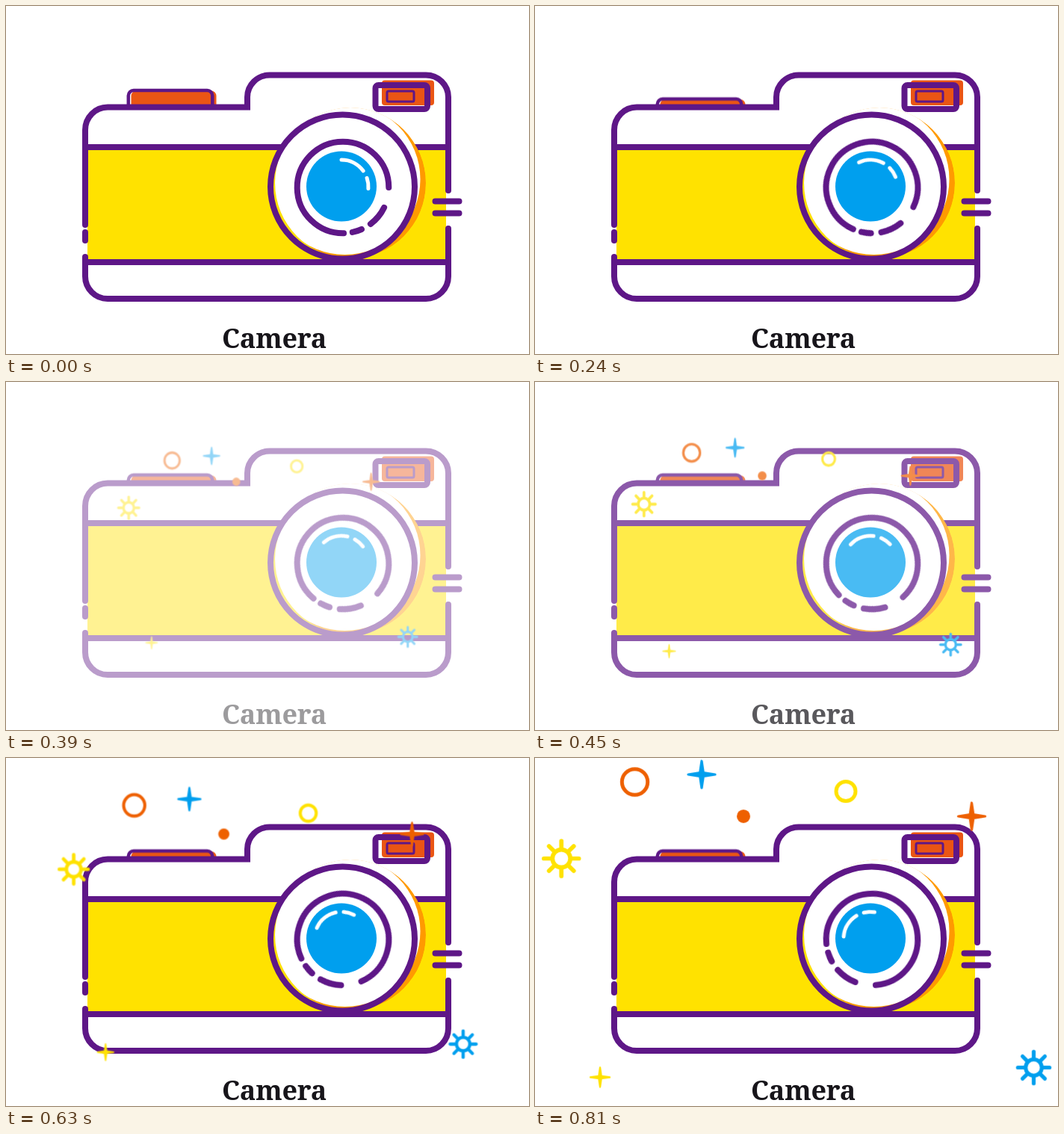
Animation, 700 px wide and 466 px high, one loop 840 ms. Source, as an HTML page:

```html
<!DOCTYPE html>
<html lang="en">
<head>
<meta charset="utf-8">
<title>Camera</title>
<style>
  html, body { margin: 0; width: 100%; height: 100%; overflow: hidden; background: #fff; }
  svg { display: block; width: 700px; height: 466px; }
  .line { fill: none; stroke: #5e1787; stroke-width: 8; }
  .cap { stroke-linecap: round; }
  #ring { transform-origin: 451px 243px; }
  #glint { transform-origin: 449px 242px; }
  #confetti { transform-origin: 350.4px 223px; }
  text { font: bold 36px "Noto Serif", serif; letter-spacing: -.2px; fill: #17151a; }
</style>
</head>
<body>
<svg viewBox="0 0 700 466">
  <clipPath id="disc"><circle cx="461" cy="237" r="101"/></clipPath>

  <g id="button">
    <rect x="167.5" y="113.5" width="114" height="40" rx="7" fill="#ea5514"/>
    <rect class="line" style="stroke-width:4.5" x="163.8" y="113" width="112.5" height="40" rx="7"/>
  </g>

  <path fill="#fff" d="M106 166Q106 135.500 136 135.500H323V122Q323 92.500 353 92.500H562Q592 92.500 592 122V362Q592 392 562 392H136Q106 392 106 362Z"/>
  <rect x="109" y="189" width="480" height="154" fill="#ffe200"/>
  <path class="line" d="M106 189H592M106 343H592"/>
  <path class="line cap" d="M106 293V166A30 30.500 0 0 1 136 135.500H323V122A30 29.500 0 0 1 353 92.500H562A30 29.500 0 0 1 592 122V247M592 298V362A30 30 0 0 1 562 392H136A30 30 0 0 1 106 362V336M106 303V314"/>
  <path class="line cap" d="M574.500 261.500H606.500M574.500 277.500H606.500"/>

  <!-- lens disc sits off-centre behind the rim, shaded on its lower right -->
  <g clip-path="url(#disc)">
    <circle cx="461" cy="237" r="101" fill="#ff9a00"/>
    <circle cx="453.500" cy="232" r="101" fill="#fff"/>
  </g>
  <circle class="line" cx="450.500" cy="242" r="96.500"/>
  <g id="ring" class="line cap"></g>
  <circle cx="449" cy="241.500" r="47" fill="#009fee"/>
  <g id="glint" fill="none" stroke="#fff" stroke-width="5" stroke-linecap="round"></g>

  <rect x="503" y="99.500" width="70" height="33.500" rx="4" fill="#ea5514"/>
  <rect class="line" x="494.500" y="106" width="69.500" height="32" rx="4"/>
  <rect class="line" style="stroke-width:3" x="510" y="114" width="36" height="14" rx="2"/>

  <text x="359" y="458" text-anchor="middle">Camera</text>
  <g id="confetti"></g>
  <rect id="flash" width="700" height="466" fill="#fff" opacity="0"/>
</svg>
<script>
const LOOP = 840;
const $ = id => document.getElementById(id);

function add(parent, tag, attrs) {
  const el = document.createElementNS("http://www.w3.org/2000/svg", tag);
  for (const key in attrs) el.setAttribute(key, attrs[key]);
  return parent.appendChild(el);
}

function arc(parent, cx, cy, r, from, to) {
  const at = deg => {
    const a = deg * Math.PI / 180;
    return `${cx + r * Math.cos(a)} ${cy + r * Math.sin(a)}`;
  };
  const large = to - from > 180 ? 1 : 0;
  add(parent, "path", { d: `M${at(from)}A${r} ${r} 0 ${large} 1 ${at(to)}` });
}

for (const [from, to] of [[89, 360], [26, 53], [66, 78]]) arc($("ring"), 451, 243, 61.3, from, to);
for (const [from, to] of [[-90, -36], [-19, 4]]) arc($("glint"), 449, 242, 36, from, to);

// Confetti pieces, placed as they lie at full spread
const ORANGE = "#ee6000", YELLOW = "#ffe200", BLUE = "#009fee";
const box = $("confetti");

function hoop(x, y, r, color) {
  add(box, "circle", { cx: x, cy: y, r, fill: "none", stroke: color, "stroke-width": 5 });
}

function star(x, y, r, color) {
  const k = r * .13;
  add(box, "path", {
    d: `M0 ${-r}L${k} ${-k}L${r} 0L${k} ${k}L0 ${r}L${-k} ${k}L${-r} 0L${-k} ${-k}Z`,
    transform: `translate(${x} ${y})`, fill: color, stroke: color,
    "stroke-width": r * .18, "stroke-linejoin": "round"
  });
}

function sun(x, y, r, color) {
  const g = add(box, "g", {
    transform: `translate(${x} ${y})`, fill: "none", stroke: color,
    "stroke-width": r * .22, "stroke-linecap": "round"
  });
  add(g, "circle", { r: r * .46 });
  for (let i = 0; i < 8; i++) {
    add(g, "path", { d: `M0 ${-r * .58}V${-r * .9}`, transform: `rotate(${i * 45})` });
  }
}

hoop(133.5, 32, 17.2, ORANGE);
hoop(416, 44.5, 13, YELLOW);
add(box, "circle", { cx: 279, cy: 78, r: 9, fill: ORANGE });
star(223, 22, 18, BLUE);
star(584.5, 78, 18, ORANGE);
star(87, 427.5, 13, YELLOW);
sun(667.5, 414.5, 23.5, BLUE);
sun(35.2, 134.5, 26, YELLOW);

// Each row: time in ms, value, optional easing
function play(id, prop, rows) {
  const frames = rows.map(([ms, value, easing = "linear"]) =>
    ({ offset: ms / LOOP, [prop]: value, easing }));
  return $(id).animate(frames, { duration: LOOP, iterations: Infinity, easing: "steps(28)" });
}

const all = [
  play("button", "transform", [[0, "translateY(0px)"], [240, "translateY(11.5px)"], [LOOP, "translateY(11.5px)"]]),
  play("ring", "transform", [[0, "rotate(0deg)"], [LOOP, "rotate(88.5deg)"]]),
  play("glint", "transform", [[0, "rotate(0deg)"], [LOOP, "rotate(-88.5deg)"]]),
  play("confetti", "opacity", [[0, 0], [299, 0, "step-end"], [299.5, 1], [LOOP, 1]]),
  play("confetti", "transform", [
    [0, "scale(.503, .535)"], [300, "scale(.503, .535)"], [LOOP, "scale(1.029, 1.027)"]
  ]),
  play("flash", "opacity", [[0, 0], [240, 0], [300, 1], [510, 0], [LOOP, 0]])
];
for (const a of all) a.startTime = document.timeline.currentTime;
</script>
</body>
</html>
```
